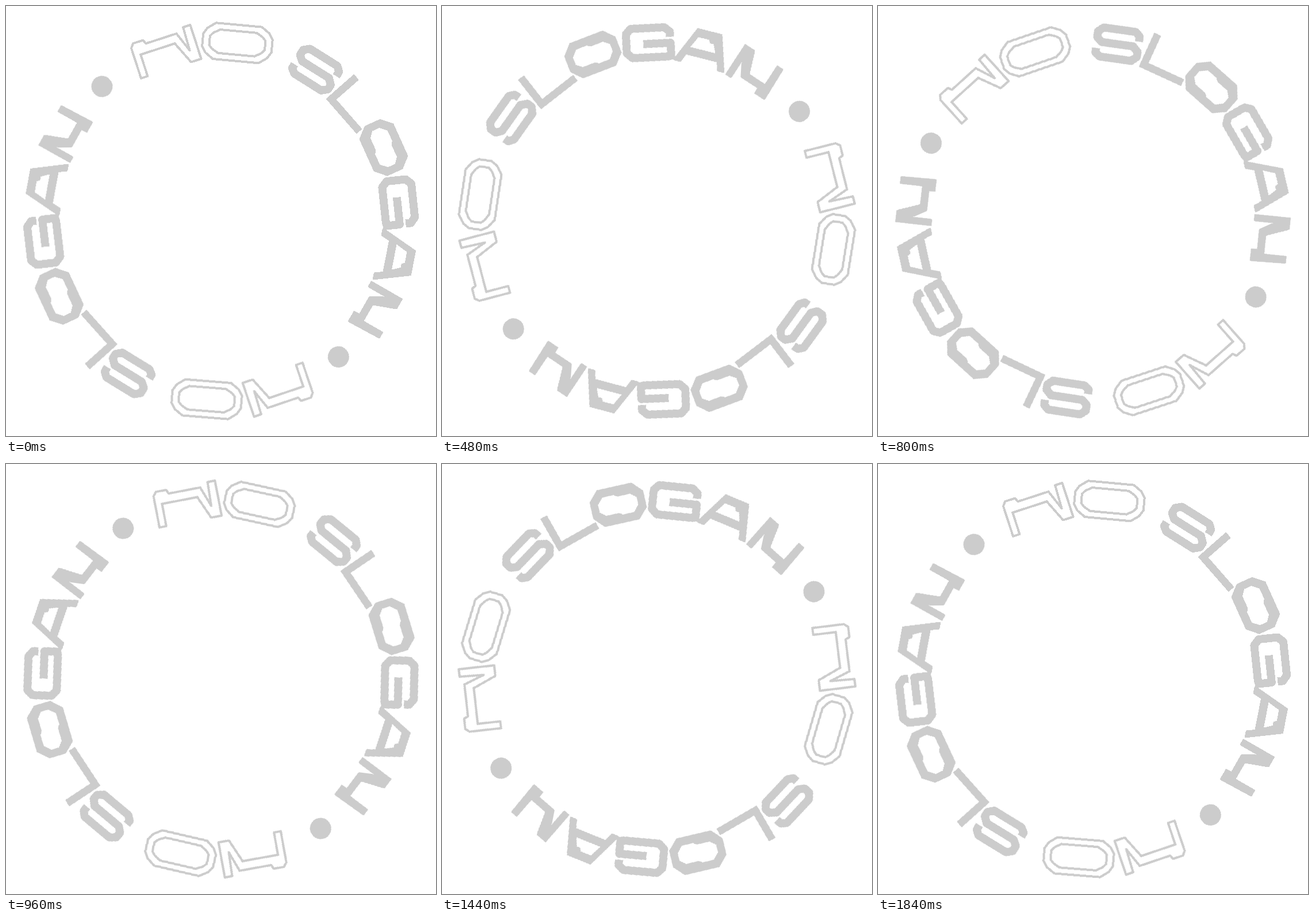
An HTML page that plays this animation: 748 by 748 pixels, repeating every 1.92 s.

```html
<!DOCTYPE html>
<html lang="en">
<head>
<meta charset="utf-8">
<title>No slogan ring</title>
<style>
  html, body { margin: 0; width: 100%; height: 100%; overflow: hidden; background: #fff; }
  svg { display: block; width: 100vw; height: 100vh; shape-rendering: crispEdges; }
  .spin { transform-origin: 0 0; animation: spin 1920ms infinite; }
  .line, .bar { fill: none; stroke: #ccc; stroke-linejoin: round; }
  .line { stroke-width: 4; }
  .bar { stroke-width: 14; }
  .solid { fill: #ccc; fill-rule: evenodd; stroke: #ccc; stroke-width: 3.5; stroke-linejoin: round; }
  .dot { fill: #ccc; }
  /* 23 equal steps of 80 ms make a full turn, then one step of rest */
  @keyframes spin {
    0% { transform: rotate(0deg); animation-timing-function: steps(23, end); }
    95.83%, 100% { transform: rotate(360deg); }
  }
</style>
</head>
<body>
<svg viewBox="0 0 748 748" role="img" aria-label="NO SLOGAN • NO SLOGAN •">
  <defs>
    <!-- Each glyph stands at the top of the ring and is turned to its place -->
    <g id="phrase">
      <path class="line" transform="rotate(-18)" d="M-55.5-334L-50-341H-32L-29-334H27L40-299L41.5-341H54.5V-279H36L19-318.5H-43.5V-279H-55.5Z"/>
      <g class="line" transform="rotate(5.25) translate(0 -311)">
        <path d="M-60.5-11L-54-21.5L-40-31.5H40L54-21.5L60.5-11V11L54 21.5L40 31.5H-40L-54 21.5L-60.5 11Z"/>
        <path d="M-48.5-8L-43-14L-32-20.5H32L43-14L48.5-8V8L43 14L32 20.5H-32L-43 14L-48.5 8Z"/>
      </g>
      <path class="bar" transform="rotate(32.1)" d="M36-320V-329L28-336H-28L-37-328V-318L-28-310.5H27L36-302V-293L27-285H-28L-36.5-291V-299"/>
      <path class="solid" transform="rotate(48.8)" d="M-38-340.5H-28.5V-288.5H39.5V-279H-38Z"/>
      <path class="solid" transform="rotate(65.7) translate(0 -310.5)" d="M-46-14L-30-31H30L46-14V14L30 31H-30L-46 14ZM-36-8L-25-20H-4L2-16H25L36-7V8L25 20H4L-2 16H-25L-36 7Z"/>
      <path class="bar" transform="rotate(84)" d="M38-319V-328L29-336H-30L-38.5-327V-294L-29-285H35M-9-308.5H38.5V-279"/>
      <path class="solid" transform="rotate(101)" d="M-40-280L-13-341H29L48-280H38.5L34-295H-23L-29.5-280ZM-21-306L-10-329.5H12L14-324H21L29-306Z"/>
      <path class="solid" transform="rotate(119.9)" d="M-38.5-340H-20.5L-6-300.5H28.5V-339.5H38.5L40-280H21.5V-290.5H-14L-29.5-319V-280H-38.5Z"/>
      <circle class="dot" cy="-312.4" r="18.5" transform="rotate(139.16)"/>
    </g>
  </defs>
  <g transform="translate(374 374)">
    <g class="spin">
      <use href="#phrase"/>
      <use href="#phrase" transform="rotate(179.34)"/>
    </g>
  </g>
</svg>
</body>
</html>
```
